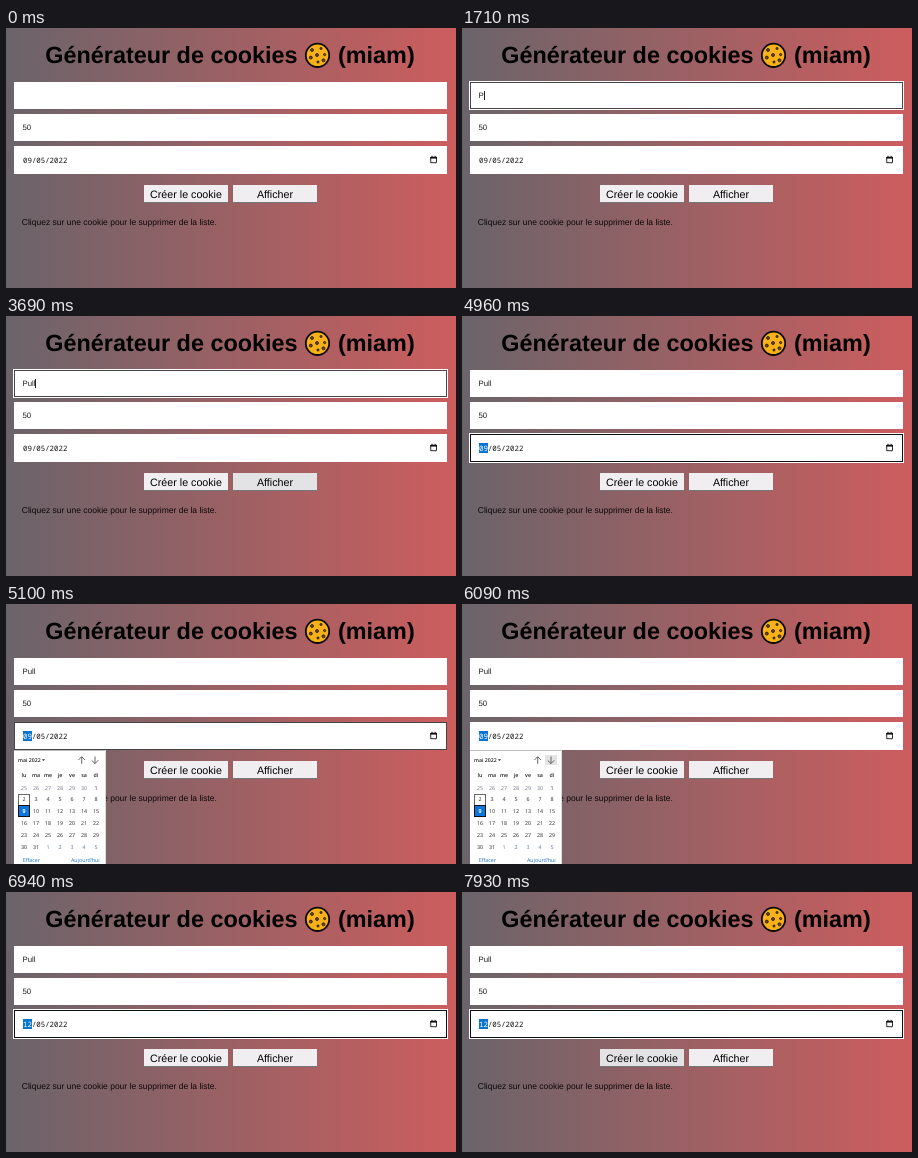
An HTML page for the animation above (8 s loop, 450 by 260 pixels).

```html
<!DOCTYPE html>
<html lang="fr">
<head>
<meta charset="utf-8">
<title>Générateur de cookies</title>
<style>
html, body { margin: 0; width: 100%; height: 100%; overflow: hidden; }
body { background: linear-gradient(90deg, #6a646a, #cd5d5e); }
svg { display: block; width: 450px; height: 260px; }
text { font-family: "Liberation Sans", Arial, sans-serif; text-rendering: geometricPrecision; white-space: pre; }
rect { shape-rendering: crispEdges; }
.title { font-size: 23.4px; font-weight: bold; }
.value { font-size: 7.8px; fill: #1c1c1c; }
.date { font: 7.4px "Noto Sans Mono", "DejaVu Sans Mono", monospace; fill: #111; }
.button { font-size: 10.7px; text-anchor: middle; }
.note { font-size: 8.5px; fill: #0c0808; }
.field { fill: #fff; }
.outline { fill: none; stroke: #444; }
.ring .out { fill: none; stroke: #fff; }
.ring .in { fill: none; stroke: #101010; }
.ring.soft .in { stroke: #4c4444; }
.face { fill: #f0eef1; }
.face.on { fill: #e3e2e4; }
.edge { fill: #75757c; }
.cal text { font: 5.3px "Open Sans", "Noto Sans", sans-serif; fill: #222; }
.cal .day, .cal .head { text-anchor: middle; }
.cal .head { font-weight: 600; }
.cal .month { font-weight: 600; font-size: 5.2px; }
.cal .other { fill: #6d7480; }
.cal .late { fill: #56749c; }
.cal .link { fill: #1670c8; }
.cal .day.pick { fill: #fff; font-weight: 700; }
.arrow { fill: none; stroke: #555; stroke-width: .9; }
.chosen { fill: #0e76e0; stroke: #101010; }
.hide { display: none; }
</style>
</head>
<body>
<svg viewBox="0 0 450 260">
  <text class="title" x="39.3" y="35">Générateur de cookies</text>
  <g stroke="#0d0a06">
    <circle cx="311.5" cy="27.3" r="11.7" fill="#f7b21a" stroke-width="1.8"/>
    <g id="chips" fill="#7a4a12" stroke-width=".7"></g>
  </g>
  <text class="title" x="332" y="35">(miam)</text>

  <rect class="field" x="8" y="54" width="433" height="27"/>
  <rect class="field" x="8" y="86" width="433" height="27"/>
  <rect class="field" x="8" y="118" width="433" height="28"/>
  <rect id="hoverNumber" class="outline" x="8.5" y="86.5" width="432" height="26"/>
  <rect id="hoverDate" class="outline" x="8.5" y="118.5" width="432" height="27"/>
  <g id="ringName" class="ring soft">
    <rect class="out" x="7.5" y="53.5" width="434" height="28"/>
    <rect class="in" x="8.5" y="54.5" width="432" height="26"/>
  </g>
  <g id="ringDate" class="ring">
    <rect class="out" x="7.5" y="117.5" width="434" height="29"/>
    <rect class="in" x="8.5" y="118.5" width="432" height="27"/>
  </g>

  <text id="name" class="value" x="16.5" y="70"></text>
  <rect id="caret" y="63" width="1" height="9" fill="#222"/>
  <text class="value" x="16.5" y="102">50</text>
  <rect id="mark" x="17" y="127" width="9" height="10" fill="#0874cf"/>
  <text class="date" x="17" y="134.6"><tspan id="day">09</tspan>/05/2022</text>
  <g fill="none" stroke="#111" stroke-width=".9">
    <path d="M424.7 129.2h5.8v5.5h-5.8z"/>
    <path d="M424.3 129.8h6.6" stroke-width="1.6"/>
    <path d="M426 127.8v1.4M429.2 127.8v1.4"/>
  </g>

  <rect class="edge" x="138" y="157" width="84" height="18"/>
  <rect id="create" class="face" x="138" y="157" width="84" height="17"/>
  <text class="button" x="180" y="169.5">Créer le cookie</text>
  <rect class="edge" x="227" y="157" width="84" height="18"/>
  <rect id="show" class="face" x="227" y="157" width="84" height="17"/>
  <text class="button" x="269" y="169.5">Afficher</text>
  <text class="note" x="15.8" y="197.4">Cliquez sur une cookie pour le supprimer de la liste.</text>

  <g id="cal" class="cal">
    <rect x="8" y="146" width="92" height="114" fill="#fff"/>
    <path d="M8 146.5h92" stroke="#bbb"/>
    <path d="M99.5 146v114" stroke="#ddd"/>
    <text class="month" x="12" y="157.6">mai 2022</text>
    <path d="M36 155.2h3l-1.5 1.7z" fill="#222"/>
    <rect id="hoverArrow" x="83" y="151" width="12" height="10" fill="#e4e4e4"/>
    <path class="arrow" d="M75.7 159.8v-7M72.4 156l3.3-3.3 3.3 3.3M89 152.5v7M85.7 156.3l3.3 3.3 3.3-3.3"/>
    <rect x="12.5" y="190.5" width="11" height="11" fill="none" stroke="#666"/>
    <rect id="hoverDay" x="48" y="201" width="12" height="12" fill="#e4e4e4"/>
    <rect id="chosen" class="chosen" y="201.5" width="11" height="11"/>
    <g id="days"></g>
    <text class="link" x="16.8" y="257.8">Effacer</text>
    <text class="link" x="65" y="257.8">Aujourd'hui</text>
  </g>
</svg>
<script>
const LOOP = 8000;
const $ = id => document.getElementById(id);

function add(parent, tag, attrs, text = '') {
  const el = document.createElementNS('http://www.w3.org/2000/svg', tag);
  for (const key in attrs) el.setAttribute(key, attrs[key]);
  el.textContent = text;
  parent.append(el);
  return el;
}

[[306, 22], [315, 20.5], [311, 27], [318.6, 26.6], [304.8, 29.6], [312, 34], [317.5, 32.3]]
  .forEach(([cx, cy], i) => add($('chips'), 'circle', { cx, cy, r: i % 2 ? 1.1 : 1.5 }));

const column = i => 18 + 12 * i;
['lu', 'ma', 'me', 'je', 've', 'sa', 'di'].forEach((label, i) =>
  add($('days'), 'text', { class: 'head', x: column(i), y: 172.8 }, label));

const days = {};
for (let i = 0; i < 42; i++) {
  const n = i - 5;
  const label = n < 1 ? n + 30 : n > 31 ? n - 31 : n;
  const kind = n < 1 ? 'day other' : n > 31 ? 'day late' : 'day';
  days[n] = add($('days'), 'text',
    { class: kind, x: column(i % 7), y: 185.5 + 11.8 * Math.floor(i / 7) }, label);
}

// Time spans in ms during which each part is visible
const visible = {
  ringName: [[140, 4960]],
  caret: [[140, 570], [1140, 2840], [3260, 3830], [4390, 4960]],
  hoverNumber: [[2980, 3120]],
  hoverDate: [[3120, 3260], [4110, 4960], [5100, 5380]],
  ringDate: [[4960, 5100], [6940, LOOP]],
  mark: [[4960, LOOP]],
  cal: [[5100, 6940]],
  hoverArrow: [[6090, 6370]],
  hoverDay: [[6370, 6800]]
};
const hovered = {
  create: [[3260, 3690], [7930, LOOP]],
  show: [[3690, 3830], [7790, 7930]]
};
const keys = [1710, 1850, 2130, 2270];
const caretX = [17, 22, 26, 28, 29];
const within = (spans, t) => spans.some(([from, to]) => t >= from && t < to);

function draw(t) {
  for (const id in visible) $(id).classList.toggle('hide', !within(visible[id], t));
  for (const id in hovered) $(id).classList.toggle('on', within(hovered[id], t));

  const typed = keys.filter(k => t >= k).length;
  $('name').textContent = 'Pull'.slice(0, typed);
  $('caret').setAttribute('x', caretX[typed]);

  $('day').textContent = t < 6940 ? '09' : '12';
  $('day').style.fill = t < 4960 ? '' : '#fff';
  const late = t >= 6800;
  $('chosen').setAttribute('x', late ? 48.5 : 12.5);
  days[9].classList.toggle('pick', !late);
  days[12].classList.toggle('pick', late);
}

function tick() {
  draw(performance.now() % LOOP);
  requestAnimationFrame(tick);
}
tick();
</script>
</body>
</html>
```
